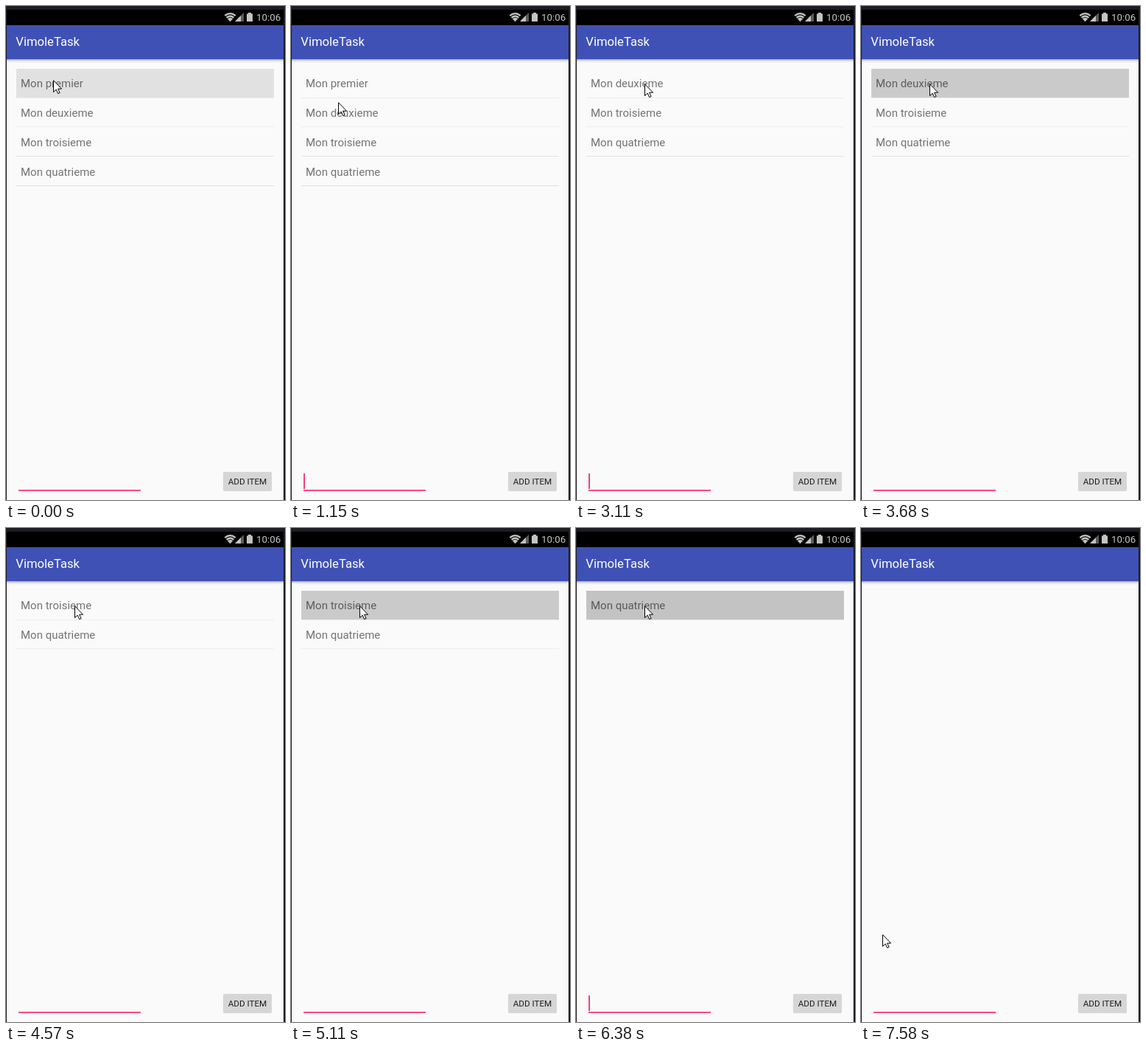
Write an HTML page that moves like this. It is 379 px wide and 669 px high and loops after 8 s.

```html
<!DOCTYPE html>
<html lang="fr">
<head>
<meta charset="utf-8">
<title>Todo list</title>
<style>
  html, body { margin: 0; width: 100%; height: 100%; overflow: hidden; background: #1d1d24; }
  body { position: relative; font-family: Roboto, "Noto Sans", sans-serif; }
  div, svg { position: absolute; }
  .screen { left: 1px; top: 5px; width: 376px; height: 664px; background: #fafafa; }
  .status { left: 1px; top: 5px; width: 376px; height: 21px; background: #000; }
  .clock { left: 340px; top: 5px; font-size: 13.33px; line-height: 21px; color: #c6c6c6; }
  .icons { left: 296px; top: 8px; }
  .bar {
    left: 1px; top: 26px; width: 376px; height: 46px;
    background: #3f51b5; color: #fff;
    font-size: 16.67px; line-height: 46px; text-indent: 12.3px;
  }
  .shade {
    left: 1px; top: 72px; width: 376px; height: 5px;
    background: linear-gradient(rgba(0,0,0,.3), rgba(0,0,0,.07) 55%, transparent);
  }

  .list, .rows, .press, .caret, .cursor { animation: 8s step-end infinite; }

  .list { left: 14px; top: 85px; width: 350px; height: 159px; overflow: hidden; animation-name: shrink; }
  .line { left: 0; width: 350px; height: 1px; }
  .press { left: 0; top: 0; width: 350px; height: 39px; background: #000; animation-name: press; }
  .rows {
    left: 6px; top: 0; font-size: 15px; line-height: 40px;
    color: rgba(0,0,0,.54); white-space: pre; animation-name: shift;
  }
  .field { left: 17px; top: 655px; width: 166px; height: 2px; background: #f94b87; }
  .caret { left: 17px; top: 633px; width: 2px; height: 21px; background: #f0407f; animation-name: blink; }
  .button {
    left: 295px; top: 631px; width: 66px; height: 26px; border-radius: 2px;
    background: #d6d6d6; color: rgba(0,0,0,.87);
    box-shadow: 0 0 1px rgba(0,0,0,.12);
    font-size: 11.67px; line-height: 26px; text-align: center; white-space: nowrap;
  }
  .cursor { left: 0; top: 0; overflow: visible; animation-name: move; }

  @keyframes shrink {
    0% { height: 159px; }
    33.75% { height: 119px; }
    51.375% { height: 79px; }
    65.5% { height: 40px; }
    80.875%, 100% { height: 0; }
  }
  @keyframes shift {
    0% { transform: none; }
    33.75% { transform: translateY(-40px); }
    51.375% { transform: translateY(-80px); }
    65.5% { transform: translateY(-120px); }
    80.875%, 100% { transform: translateY(-160px); }
  }
  /* each long press darkens the row, then the row goes away */
  @keyframes press {
    0%, 26.625%, 42.625%, 58.625%, 74% { opacity: .1; }
    1.875% { opacity: .04; }
    28.375%, 44.5%, 60.375%, 75.875% { opacity: .15; }
    30.125%, 46%, 62.125% { opacity: .193; }
    78% { opacity: .22; }
    31.875%, 49.5%, 64% { opacity: .26; }
    3.75%, 33.75%, 51.375%, 65.5%, 80.875%, 100% { opacity: 0; }
  }
  @keyframes blink {
    0%, 7.625%, 19.75%, 31.875%, 44.5%, 57.125%, 70.625%, 82.5%, 94.75%, 100% { opacity: 0; }
    1.875%, 14.375%, 26.625%, 38.875%, 51.375%, 64%, 75.875%, 88.125% { opacity: 1; }
  }
  @keyframes move {
    0% { transform: translate(64px, 100px); }
    9.375% { transform: translate(64px, 112px); }
    11% { transform: translate(64px, 124px); }
    12.625% { transform: translate(64px, 130px); }
    16.25% { transform: translate(80px, 124px); }
    18% { transform: translate(102px, 112px); }
    19.75% { transform: translate(97px, 107px); }
    21.625% { transform: translate(93px, 105px); }
    84.375% { transform: translate(62px, 270px); }
    86.25% { transform: translate(29px, 487px); }
    88.125%, 100% { transform: translate(29px, 550px); }
  }
</style>
</head>
<body>
  <div class="screen"></div>
  <div class="status"></div>
  <svg class="icons" width="42" height="15">
    <g fill="none" stroke="#c4c4c4" stroke-width="2.3">
      <path d="M1.3 5.2Q8.5 -1 15.7 5.2"/>
      <path d="M3.6 7.8Q8.5 3.6 13.4 7.8"/>
    </g>
    <path fill="#c4c4c4" d="M4.8 9.3Q8.5 6.2 12.2 9.3L8.5 13.3Z"/>
    <path fill="#5c5c5c" d="M15 13L27 1V13Z"/>
    <path fill="#c4c4c4" d="M15 13L23 5V13Z"/>
    <path fill="#c4c4c4" d="M31 2.5H33V1H37V2.5H39V13H31Z"/>
  </svg>
  <div class="clock">10:06</div>
  <div class="bar">VimoleTask</div>
  <div class="shade"></div>

  <div class="list">
    <div class="line" style="top:39px;background:#ededed"></div>
    <div class="line" style="top:78px;background:#eee"></div>
    <div class="line" style="top:118px;background:#e2e2e2"></div>
    <div class="line" style="top:158px;background:#dedede"></div>
    <div class="press"></div>
    <div class="rows">Mon premier
Mon deuxieme
Mon troisieme
Mon quatrieme</div>
  </div>

  <div class="field"></div>
  <div class="caret"></div>
  <div class="button">ADD ITEM</div>

  <svg class="cursor" width="13" height="20">
    <path d="M.5 .8V16.6L4.2 13.1L6.7 18.6L9.1 17.5L6.6 12.2H11.6Z"
      fill="#fff" stroke="#000" stroke-width="1" stroke-linejoin="round"/>
  </svg>
</body>
</html>
```
